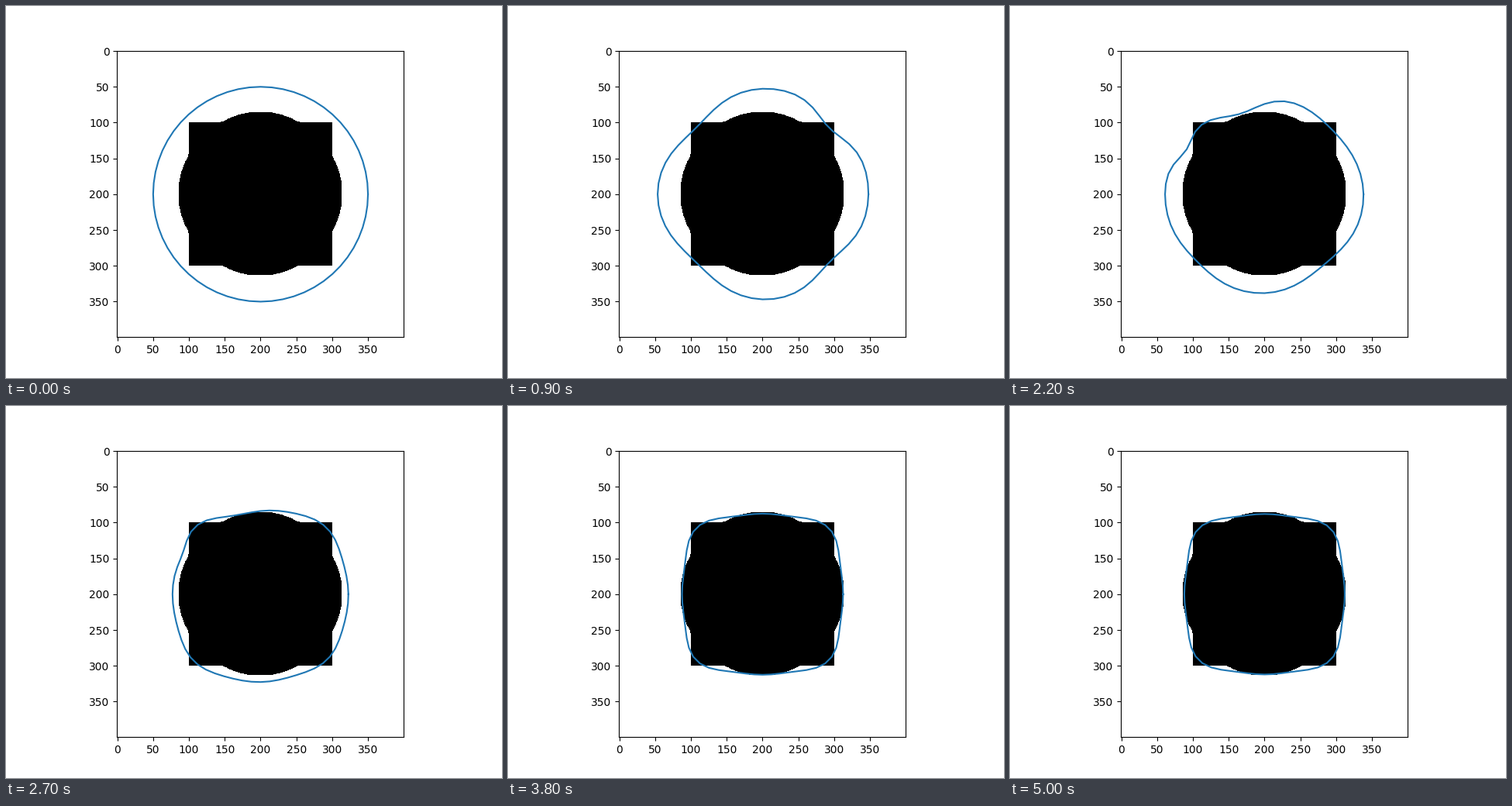
These frames come from a looping animation (640 by 480 pixels, 5.1 s). A matplotlib script:

```python
import numpy as np
import matplotlib.pyplot as plt
from matplotlib.animation import FuncAnimation

FRAMES, STEP = 51, 100
SIZE, CENTER, SCALE = 400, 200, 0.924   # SCALE: screen pixels per data unit
ANGLES = np.linspace(0, 360, 61)        # counter-clockwise from the right


def distance(angle):
    """Angular distance of every contour point from the given angle."""
    return np.abs((ANGLES - angle + 180) % 360 - 180)


def pose(radius, *bumps):
    """Circle with Gaussian bumps, each (angle, height, width in degrees)."""
    r = np.full_like(ANGLES, radius)
    for angle, height, width in bumps:
        r += height * np.exp(-(distance(angle) / width) ** 2 / 2)
    return r


def rounded_square(radius, height):
    return pose(radius, *[(corner, height, 13.5) for corner in (45, 135, 225, 315)])


CIRCLE = pose(150 * SCALE)
PINCHED = pose(136.8, (45, -15.5, 12.5), (135, -15.5, 18), (226, -14, 19), (315, -13.8, 15))
DENTED = pose(134.2, (47, -10.3, 16), (123, -17.2, 17), (227, -9, 22), (315, -14.8, 15))
FOLDED = pose(128.5, (45, -8, 20), (107, -20, 16), (150, -12, 9), (225, -5.5, 15),
              (310, -9.5, 18))
HUGGING = rounded_square(104, 17.2)
SETTLED = rounded_square(103.4, 16.8)

# The final collapse begins at the top and reaches the other sides later.
COLLAPSE_START = 2200 + 200 * np.minimum(1, distance(95) / 45)
COLLAPSE_END = 3200


def mix(a, b, u):
    return a + (b - a) * u


def radii(t):
    if t <= 900:
        return mix(CIRCLE, PINCHED, t / 900)
    if t <= 1400:
        return mix(PINCHED, DENTED, (t - 900) / 500)
    if t <= 2200:
        return mix(DENTED, FOLDED, ((t - 1400) / 800) ** 1.6)
    if t <= COLLAPSE_END:
        u = np.clip((t - COLLAPSE_START) / (COLLAPSE_END - COLLAPSE_START), 0, 1)
        return mix(FOLDED, HUGGING, 1 - (1 - u) ** 2)
    return mix(HUGGING, SETTLED, (t - COLLAPSE_END) / (5000 - COLLAPSE_END))


def contour(t):
    r = radii(t) / SCALE
    a = np.radians(ANGLES)
    return CENTER + r * np.cos(a), CENTER - r * np.sin(a)


def silhouette():
    y, x = np.mgrid[:SIZE, :SIZE]
    disk = np.hypot(x - 199.6, y - 199.6) < 113.8
    square = (x > 100) & (x <= 300) & (y > 100) & (y <= 300)
    return np.where(disk | square, 0, 255)


fig, ax = plt.subplots(figsize=(6.4, 4.8), dpi=100)
ax.imshow(silhouette(), cmap="gray", vmin=0, vmax=255, interpolation="nearest")
line, = ax.plot(*contour(0), color="C0", lw=1.5)
ax.set_xlim(-0.5, SIZE - 0.5)
ax.set_ylim(SIZE - 0.5, -0.5)


def draw(frame):
    line.set_data(*contour(frame * STEP))
    return line,


anim = FuncAnimation(fig, draw, frames=FRAMES, interval=STEP,
                     repeat=True, repeat_delay=0)
plt.show()
```
